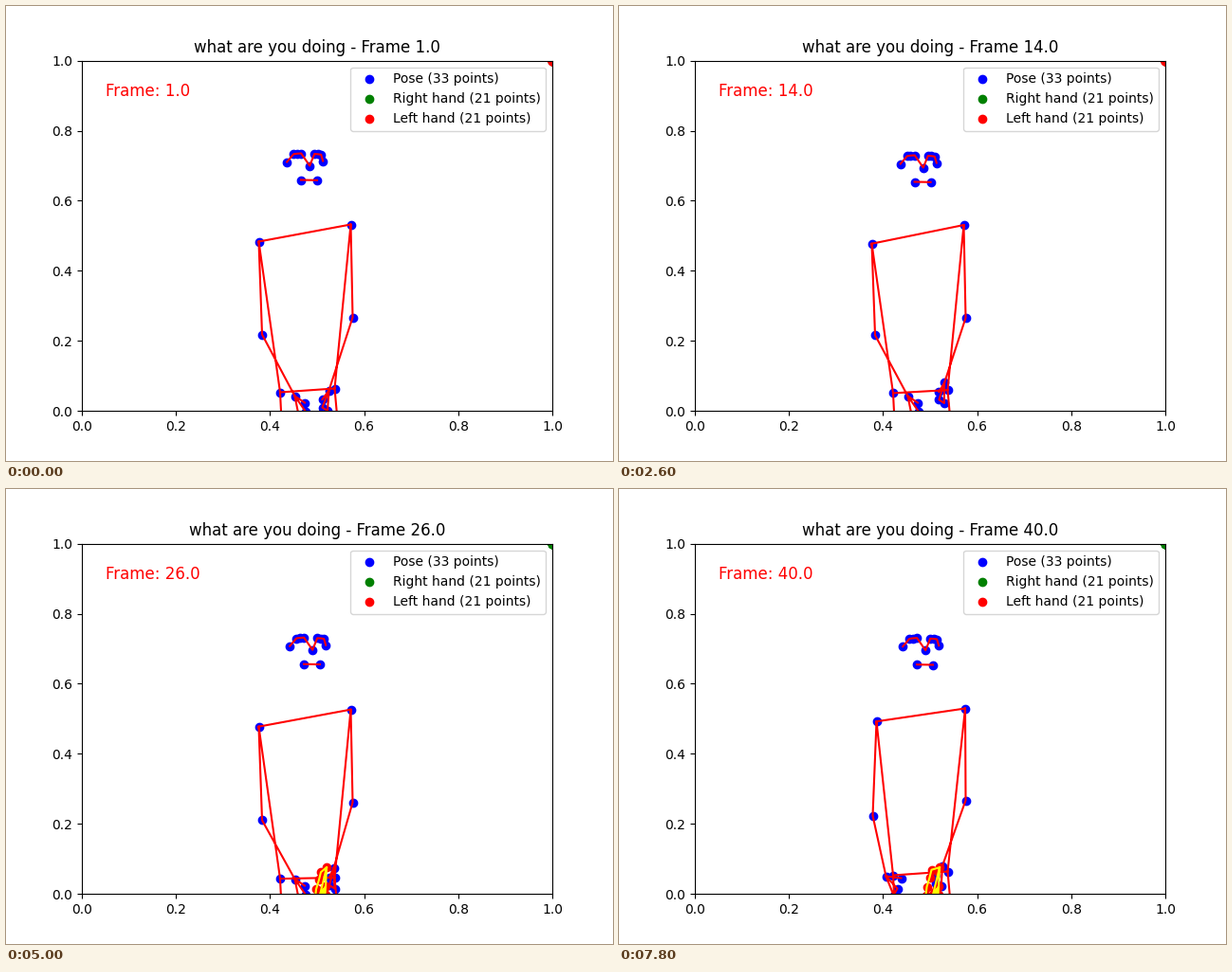
Recreate the animation shown at these times as a matplotlib script. Size 640 by 480 pixels, loop 8000 ms.

```python
import numpy as np
import matplotlib.pyplot as plt
from matplotlib.animation import FuncAnimation

COUNT = 40

# Resting skeleton in stage pixels; limbs hang from these points.
NOSE = np.array([319.7, 168])
FACE = {
    "r_ear": (-24, -4), "r_outer": (-17, -12.2), "r_eye": (-13.7, -12.7),
    "r_inner": (-9, -13), "l_inner": (5, -12.4), "l_eye": (8.7, -12.2),
    "l_outer": (12, -11.7), "l_ear": (14, -5),
    "r_mouth": (-9.2, 15), "l_mouth": (7.8, 15.3),
}
TORSO = {
    "l_shoulder": (363, 230), "r_shoulder": (266, 248),
    "l_hip": (346, 403), "r_hip": (288.5, 407),
    "l_elbow": (365, 328), "r_elbow": (269.5, 346),
}
# How many pixels each joint drops as the body leans down.
SINK = {"l_shoulder": 3, "r_shoulder": 1.3, "l_hip": 9, "r_hip": 5,
        "l_elbow": 3, "r_elbow": 4}

# Wrist, thumb, index and pinky of the right arm: resting, lifted, dropped.
ARM_REST = np.array([(304, 411), (314.5, 418), (315.5, 427.5), (309, 436)])
ARM_UP = np.array([(294, 308), (303, 285), (305, 281), (311, 294)])
ARM_DOWN = np.array([(281, 408), (297, 410), (293, 421), (289, 428)])

LEFT_WRIST = np.array([340, 405])
LEFT_FINGERS = {"l_thumb": (-7, 9.5), "l_index": (-7, 18), "l_pinky": (-1.5, 21.5)}

BONES = [
    "r_ear r_outer r_eye r_inner nose l_inner l_eye l_outer l_ear",
    "r_mouth l_mouth",
    "r_wrist r_elbow r_shoulder l_shoulder l_elbow l_wrist",
    "r_shoulder r_hip l_hip l_shoulder",
    "r_hip r_knee", "l_hip l_knee",
    "r_wrist r_pinky r_index r_wrist r_thumb",
    "l_wrist l_pinky l_index l_wrist l_thumb",
]

# Tracked hand: thumb chain, then four knuckles in a row with fingers below.
THUMB = np.array([(-6, 5), (-8, 13), (-11, 23), (-12, 32)])
KNUCKLES = np.linspace((-7, 29), (-1, 20), 4)
HAND_BONES = [[0, 1, 2, 3, 4], [0, 5, 9, 13, 17, 0]]
HAND_BONES += [list(range(b, b + 4)) for b in (5, 9, 13, 17)]


def to_data(pts):
    """Pixel centres to axes data."""
    x, y = np.array(pts, float).T + 0.5
    return np.column_stack([(x - 80) / 496, (427.2 - y) / 369.6])


def chains(parts):
    """Join polylines into one array with gaps between them."""
    gap = np.full((1, 2), np.nan)
    return np.vstack([row for part in parts for row in (part, gap)])


def ramp(n, start, end):
    u = np.clip((n - start) / (end - start), 0, 1)
    return u * u * (3 - 2 * u)


def pose(n):
    nod = np.interp(n, [1, 10, 14, 22, 32, 40], [0, 0.5, 2, 1.7, 0.5, 1.7])
    sink = np.interp(n, [10, 32, 39], [0, 1, 0])
    lift, drop = ramp(n, 28, 32), ramp(n, 34, 38)

    p = {"nose": NOSE + (3 * ramp(n, 10, 24), nod)}
    for name, offset in FACE.items():
        p[name] = p["nose"] + offset
    for name, (x, y) in TORSO.items():
        p[name] = np.array([x, y + SINK[name] * sink])
    p["r_shoulder"] += (5 * drop, nod - 5 * drop)
    p["l_shoulder"] += (1.5 * drop, drop)
    p["r_elbow"] -= (1.5 * lift + drop, 2 * drop)
    p["r_knee"] = p["r_hip"] + (10, 200)
    p["l_knee"] = p["l_hip"] + (18, 200)

    arm = ARM_REST + (ARM_UP - ARM_REST) * lift + (ARM_DOWN - ARM_UP) * drop
    p.update(zip(("r_wrist", "r_thumb", "r_index", "r_pinky"), arm))

    # The fingers swing half as far again as the wrist.
    sway = np.interp(n, [1, 26, 32, 40], [0, 5, -3, 0.5])
    raise_ = np.interp(n, [1, 12, 26, 32], [0, -8.5, -5.5, -8])
    p["l_wrist"] = LEFT_WRIST + (sway, raise_)
    for name, offset in LEFT_FINGERS.items():
        p[name] = p["l_wrist"] + offset + (sway / 2, 0)
    return p


def left_hand(n):
    spread = ramp(n, 26, 40)
    pts = [(0, 0), *(THUMB - 2.5 * spread)]
    for k in KNUCKLES:
        pts += [k + (-0.5 * j, 9 * j) for j in range(4)]
    return to_data(np.array(pts) + (337.5, 398.7))


def hand_seen(n):
    return 21 <= n < 28 or n >= 36


fig, ax = plt.subplots(figsize=(6.4, 4.8), dpi=100)
ax.set_xlim(0, 1)
ax.set_ylim(0, 1)
corner = np.ones((21, 2))
body_dots = ax.scatter([], [], color="blue", label="Pose (33 points)")
ax.scatter(*corner.T, color="green", label="Right hand (21 points)")
hand_dots = ax.scatter([], [], color="red", label="Left hand (21 points)")
body_line, = ax.plot([], [], color="red")
hand_line, = ax.plot([], [], color="yellow")
label = ax.text(0.05, 0.9, "", color="red", fontsize=12, transform=ax.transAxes)
title = ax.set_title("")
ax.legend(loc="upper right")


def draw(i):
    n = i + 1
    p = pose(n)
    body_dots.set_offsets(to_data(list(p.values())))
    body_line.set_data(*chains([to_data([p[k] for k in b.split()]) for b in BONES]).T)
    if hand_seen(n):
        hand = left_hand(n)
        hand_dots.set_offsets(hand)
        hand_line.set_data(*chains([hand[b] for b in HAND_BONES]).T)
    else:
        hand_dots.set_offsets(corner)
        hand_line.set_data([], [])
    label.set_text(f"Frame: {n:.1f}")
    title.set_text(f"what are you doing - Frame {n:.1f}")
    return body_dots, hand_dots, body_line, hand_line, label, title


anim = FuncAnimation(fig, draw, frames=COUNT, init_func=lambda: draw(0),
                     interval=200, repeat=True, repeat_delay=0)
plt.show()
```
